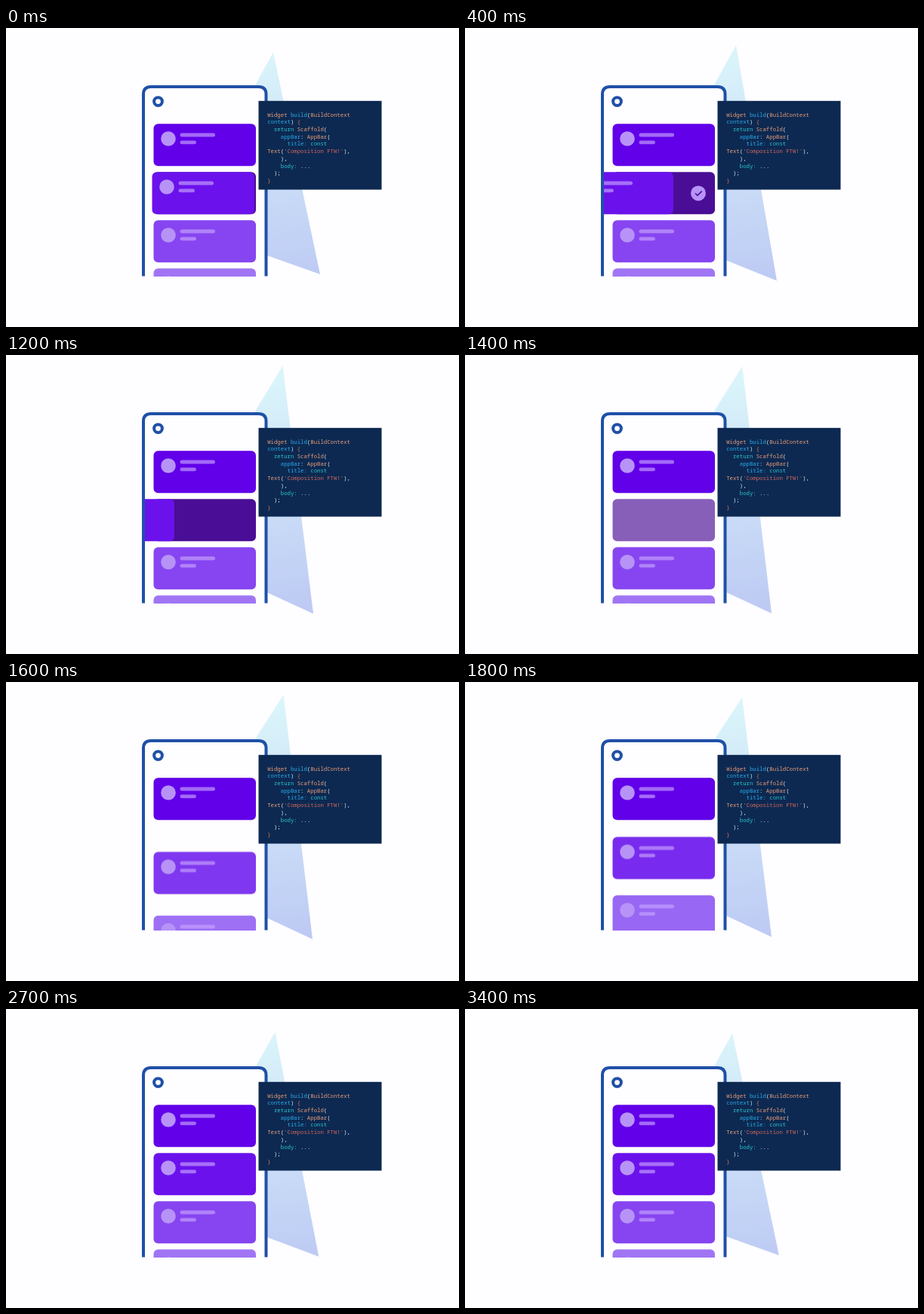
An HTML page that plays this animation: 600x397 px, repeating every 3500 ms.

```html
<!DOCTYPE html>
<html lang="en">
<head>
<meta charset="utf-8">
<title>Swipe list</title>
<style>
  :root {
    --bg: #fefdff;
    --blue: #1f50a7;
    --dark: #490e95;
    --slot1: #6100e9;
    --slot2: #6b12ec;
    --slot3: #8645f0;
    --slot4: #a075f4;
    --slot5: #bea0f7;
  }
  html, body { margin: 0; width: 100%; height: 100%; overflow: hidden; background: var(--bg); }
  svg { display: block; width: 600px; height: 397px; }

  .beam, .swiped, .under, .check, .row3, .row4, .row5 { animation: 3500ms linear infinite; }
  .beam { animation-name: sway; fill: url(#sky); }
  .swiped { animation-name: swipe; fill: var(--slot2); }
  .under { animation-name: vanish; fill: var(--dark); }
  .check { animation-name: pop; transform-box: fill-box; transform-origin: center; }
  .row3 { animation-name: rise3; }
  .row4 { animation-name: rise4; }
  .row5 { animation-name: rise5; }

  .avatar { fill: #b793f7; }
  .line { fill: rgba(200, 165, 255, .65); }
  .frame { fill: none; stroke: var(--blue); stroke-width: 4; }
  .tick { fill: none; stroke: var(--dark); stroke-width: 1.5; }

  text {
    font: 7.32px "Roboto Mono", "Noto Sans Mono", "DejaVu Sans Mono", monospace;
    fill: #e4ecf5;
    white-space: pre;
  }
  .type { fill: #ea9d78; }
  .name { fill: #29abea; }
  .key { fill: #2cc4cf; }
  .str { fill: #d4665c; }
  .brace { fill: #e0764f; }

  @keyframes sway {
    0%, 100% { d: path("M354 32.5L416 327L228 260Z"); }
    11.43% { d: path("M359 23L413 335.5L228 261Z"); }
    17.14% { d: path("M361.5 19L411.5 339.5L225 260Z"); }
    25.71% { d: path("M364.5 16L409 342.5L221 258Z"); }
    34.29% { d: path("M366.5 14.5L407 343.5L219 257Z"); }
    40% { d: path("M367.2 15.2L406 343L217 255Z"); }
    45.71% { d: path("M367.5 17L406 341.5L217 253Z"); }
    51.43% { d: path("M367 20.5L406 338.5L217 250Z"); }
    62.86% { d: path("M361.3 27L410.5 332.5L227 255Z"); }
    71.43% { d: path("M357.5 30L413.5 329.5L228 258Z"); }
    85.71% { d: path("M354.8 32L415.4 327.5L228 260Z"); }
  }
  @keyframes swipe {
    0% { transform: translateX(-2px); }
    2.86% { transform: translateX(-8px); }
    5.71% { transform: translateX(-22px); }
    8.57% { transform: translateX(-40px); }
    11.43% { transform: translateX(-55px); }
    17.14% { transform: translateX(-70px); }
    22.86% { transform: translateX(-76px); }
    28.57% { transform: translateX(-86px); }
    34.29% { transform: translateX(-108px); }
    40%, 100% { transform: translateX(-150px); }
  }
  @keyframes vanish {
    0%, 38.57% { opacity: 1; }
    42.86%, 100% { opacity: 0; }
  }
  @keyframes pop {
    0%, 2.86% { transform: scale(0); }
    10%, 25.71% { transform: scale(1); }
    30%, 100% { transform: scale(0); }
  }
  @keyframes rise3 {
    0%, 40% { transform: none; fill: var(--slot3); }
    42.86% { transform: translateY(-12px); }
    45.71% { transform: translateY(-29.5px); }
    48.57% { transform: translateY(-41.5px); }
    51.43% { transform: translateY(-49.5px); }
    57.14% { transform: translateY(-60px); }
    62.86%, 100% { transform: translateY(-64px); fill: var(--slot2); }
  }
  @keyframes rise4 {
    0%, 42.86% { transform: none; fill: var(--slot4); }
    45.71% { transform: translateY(-9px); }
    48.57% { transform: translateY(-23px); }
    51.43% { transform: translateY(-36px); }
    57.14% { transform: translateY(-53px); }
    62.86% { transform: translateY(-61px); }
    71.43%, 100% { transform: translateY(-64px); fill: var(--slot3); }
  }
  @keyframes rise5 {
    0%, 45.71% { transform: none; fill: var(--slot5); }
    51.43% { transform: translateY(-19px); }
    57.14% { transform: translateY(-43px); }
    62.86% { transform: translateY(-56px); }
    71.43%, 100% { transform: translateY(-64px); fill: var(--slot4); }
  }
</style>
</head>
<body>
<svg viewBox="0 0 600 397">
  <defs>
    <linearGradient id="sky" gradientUnits="userSpaceOnUse" x1="350" y1="30" x2="390" y2="335">
      <stop offset="0" stop-color="#daf5fa"/>
      <stop offset="1" stop-color="#bdcaf4"/>
    </linearGradient>
    <clipPath id="screen"><rect x="184" y="80" width="158.5" height="249.5"/></clipPath>
    <g id="row">
      <rect x="195.5" y="127.3" width="135.5" height="56" rx="6"/>
      <circle class="avatar" cx="215" cy="147" r="9.8"/>
      <rect class="line" x="230.5" y="139.5" width="46.5" height="5" rx="2.5"/>
      <rect class="line" x="230.5" y="149.5" width="21.5" height="4.8" rx="2.4"/>
    </g>
  </defs>

  <path class="beam" d="M354 32.5L416 327L228 260Z"/>

  <path d="M182 329.5V88Q182 78 192 78H334.5Q344.5 78 344.5 88V329.5Z" fill="#fefdff"/>
  <g clip-path="url(#screen)">
    <use href="#row" fill="#6100e9"/>
    <g class="under">
      <rect x="195.5" y="191.3" width="135.5" height="56" rx="6"/>
      <g class="check">
        <circle class="avatar" cx="309" cy="219.4" r="10"/>
        <path class="tick" d="M305 219.5l2.9 2.9l5.8-5.8"/>
      </g>
    </g>
    <g class="swiped"><use href="#row" y="64"/></g>
    <g class="row5"><use href="#row" y="256"/></g>
    <g class="row4"><use href="#row" y="192"/></g>
    <g class="row3"><use href="#row" y="128"/></g>
  </g>
  <path class="frame" d="M182 329.5V88Q182 78 192 78H334.5Q344.5 78 344.5 88V329.5"/>
  <circle class="frame" cx="201.5" cy="97.6" r="5.4"/>

  <rect x="334.5" y="96.8" width="163" height="117.8" fill="#0d2951"/>
  <g transform="translate(346.2 117.6)">
    <text><tspan class="type">Widget</tspan> <tspan class="name">build</tspan>(<tspan class="type">BuildContext</tspan></text>
    <text y="9.72"><tspan class="name">context</tspan>) <tspan class="brace">{</tspan></text>
    <text y="19.44">  <tspan class="key">return</tspan> <tspan class="type">Scaffold</tspan>(</text>
    <text y="29.16">    <tspan class="name">appBar</tspan>: <tspan class="type">AppBar</tspan>(</text>
    <text y="38.88">      <tspan class="name">title:</tspan> <tspan class="key">const</tspan></text>
    <text y="48.6"><tspan class="type">Text</tspan>(<tspan class="str">'Composition FTW!'</tspan>),</text>
    <text y="58.32">    ),</text>
    <text y="68.04">    <tspan class="key">body:</tspan> ...</text>
    <text y="77.76">  );</text>
    <text y="87.48"><tspan class="brace">}</tspan></text>
  </g>
</svg>
</body>
</html>
```
